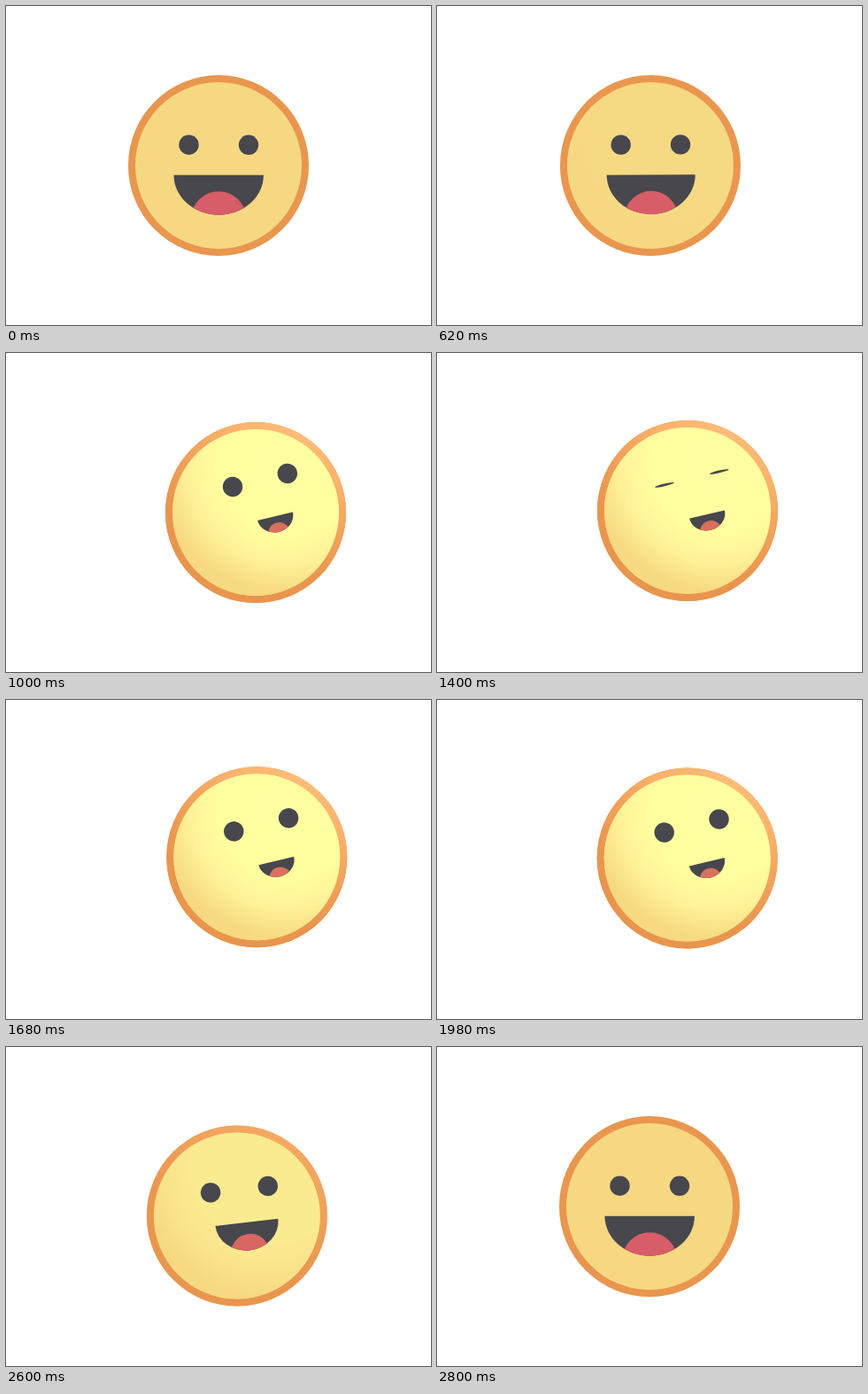
An HTML page with a canvas for the animation above (3 s loop, 480 by 360 pixels).

```html
<!DOCTYPE html>
<html lang="en">
<head>
<meta charset="utf-8">
<title>Smiling face</title>
<style>
  html, body { margin: 0; width: 100%; height: 100%; overflow: hidden; background: #fff; }
  canvas { display: block; }
</style>
</head>
<body>
<canvas id="stage" width="480" height="360"></canvas>
<script>
const ctx = document.getElementById('stage').getContext('2d');
const LOOP = 3000;
const DARK = '#47474d';
const TURN_ANGLE = -13.3 * Math.PI / 180;

const clamp = v => Math.min(1, Math.max(0, v));
const span = (t, from, to) => clamp((t - from) / (to - from));
const smooth = v => v * v * (3 - 2 * v);
const mix = (a, b, p) => a + (b - a) * p;

// Symmetric ease with a brisk start and end
function glide(v) {
  const a = v ** 1.3, b = (1 - v) ** 1.3;
  return a / (a + b);
}

function ellipse(x, y, rx, ry, fill, end = Math.PI * 2) {
  ctx.beginPath();
  ctx.ellipse(x, y, rx, ry, 0, 0, end);
  ctx.fillStyle = fill;
  ctx.fill();
}

function radial(x, y, r, stops) {
  const g = ctx.createRadialGradient(x, y, 0, x, y, r);
  stops.forEach(([at, color]) => g.addColorStop(at, color));
  return g;
}

const rimGlow = radial(45, -85, 190, [
  [0, '#ffbd79'], [.4, '#fab26c'], [.85, '#e9954d'], [1, '#e9954d']
]);
const skinGlow = radial(34, -52, 160, [
  [0, '#ffffa1'], [.48, '#fffe9f'], [.68, '#fff298'], [.9, '#f6d980'], [1, '#f6d980']
]);

// Runs a drawing in a local frame
function at(x, y, angle, scaleX, scaleY, paint) {
  ctx.save();
  ctx.translate(x, y);
  ctx.rotate(angle);
  ctx.scale(scaleX, scaleY);
  paint();
  ctx.restore();
}

function drawMouth(turn) {
  ellipse(0, 0, 50.7, 45, DARK, Math.PI);
  ctx.clip();
  const tongue = [mix(215, 217, turn), mix(93, 112, turn), mix(104, 93, turn)];
  ellipse(0, 49.5, 31, 31, `rgb(${tongue})`);
}

function drawFace(turn, blink) {
  ellipse(0, 0, 102, 102, '#e9964e');
  ctx.globalAlpha = turn;
  ellipse(0, 0, 102, 102, rimGlow);
  ctx.globalAlpha = 1;
  ellipse(0, 0, 94, 94, '#f6d882');
  ctx.globalAlpha = turn;
  ellipse(0, 0, 94, 94, skinGlow);
  ctx.globalAlpha = 1;

  const angle = TURN_ANGLE * turn;
  const open = 1 - .88 * blink;
  at(mix(-33.5, -26, turn), mix(-23.3, -29, turn), angle, 1, open,
    () => ellipse(0, 0, 11.2, 11.2, DARK));
  at(mix(34, 35.8, turn), mix(-23.2, -44, turn), angle, 1, open,
    () => ellipse(0, 0, 11.2, 11.2, DARK));

  const size = mix(1, .404, turn);
  at(mix(.2, 22, turn), mix(10.7, 4.2, turn), angle, size, size, () => drawMouth(turn));
}

function draw(t) {
  const turn = glide(span(t, 600, 1000)) - glide(span(t, 2400, 2800));
  const lift = smooth(span(t, 1000, 1600)) - smooth(span(t, 1600, 2400));
  const blink = smooth(span(t, 1270, 1390)) - smooth(span(t, 1410, 1530));
  const dip = 10.5 * Math.sin(Math.PI * turn) ** 2;

  ctx.fillStyle = '#fff';
  ctx.fillRect(0, 0, 480, 360);
  at(240 + 42 * turn + 1.3 * lift, 180 + dip - 2.8 * lift, 0, 1, 1,
    () => drawFace(turn, blink));
}

function tick() {
  draw(performance.now() % LOOP);
  requestAnimationFrame(tick);
}
tick();
</script>
</body>
</html>
```
